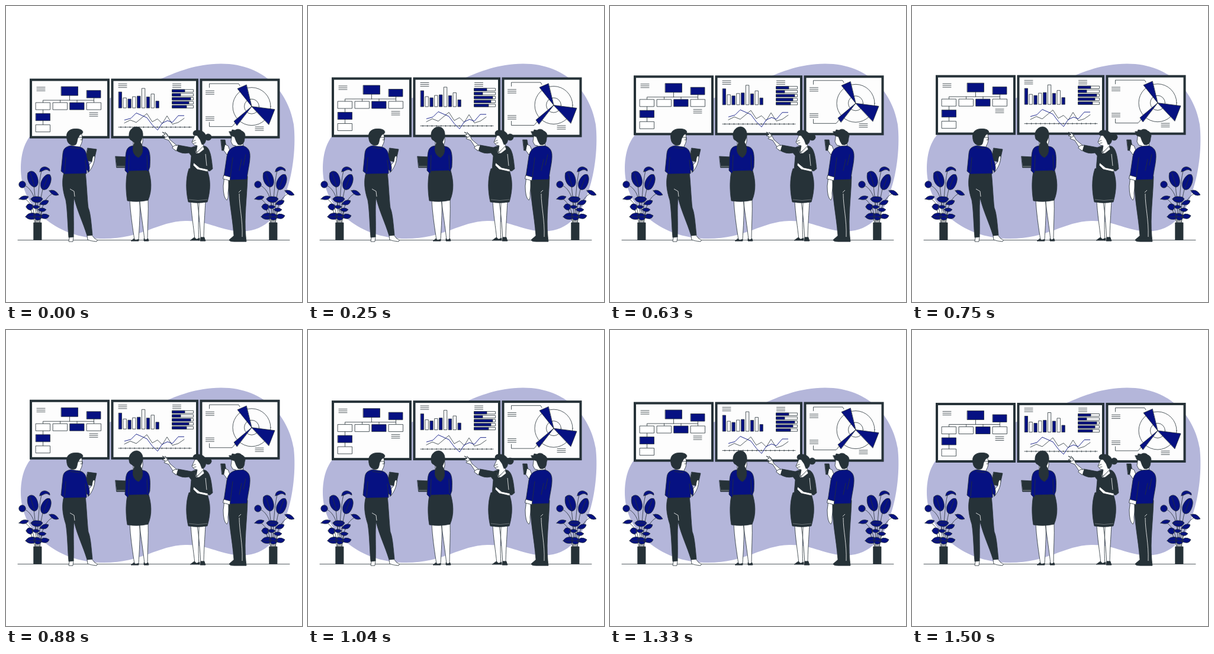
Animation of 500 by 500 pixels, one loop 1.54 s. Source, as an HTML page:

```html
<!DOCTYPE html>
<html lang="en">
<head>
<meta charset="utf-8">
<title>Team at the dashboards</title>
<style>
  html, body { margin: 0; width: 100%; height: 100%; overflow: hidden; background: #fff; }
  svg { display: block; width: 100%; height: 100%; }
  .d { fill: #263238; }
  .b { fill: #061182; }
  .w { fill: #fff; }
  .n { fill: none; }
  .d, .b, .w, .n { stroke: #263238; stroke-width: .8; stroke-linejoin: round; stroke-linecap: round; }
  .light { fill: none; stroke: #fff; stroke-width: .8; }
  .blue { fill: none; stroke: #061182; stroke-width: .9; }
</style>
</head>
<body>
<svg viewBox="0 0 500 500">
  <path fill="#b4b6da" d="M45 215C24 235 22 275 28 300C40 352 95 393 165 393C230 393 256 364 303 363C342 362 364 381 400 380.500C440 380 463 350 474 312C485 280 490 235 486 200C478 150 440 97.500 363 97.500C320 98 290 111 264 122C220 140 100 180 45 215Z"/>
  <g id="screens"></g>

  <path class="n" d="M20 395.400H479"/>
  <g id="plant">
    <path class="n" d="M51 366C51 340 49 320 45 285M53 366C53 335 55 300 60 278M55 366C56 335 60 315 67 290M50 366C48 350 46 334 31 325M57 366C58 345 65 321 81 316M49 366L41 341M57 366L61 345M51 340C49 322 42 306 29 302"/>
    <path class="b" d="M57 280C57 272 65 270 70 273Q75 275 74 279Q69 275 65 277Q60 280 57 280Z"/>
    <path class="b" d="M37 282C42 276 50 279 53 289C56 298 54 305 48 306C39 304 34 291 37 282Z"/>
    <path class="b" d="M74 285C79 290 75 304 69 309C62 313 57 308 59 298C62 289 69 282 74 285Z"/>
    <circle class="b" cx="27.500" cy="301.500" r="5.700"/>
    <path class="b" d="M22 326Q28 318 38 322Q35 330 22 326ZM73 312Q82 308 89 319Q80 323 73 312ZM42 326Q45 321 53 322Q60 322 62 326Q58 333 51 332Q44 331 42 326ZM57 335Q63 325 72 329Q70 339 57 335ZM34 339Q37 331 45 336Q47 342 42 345Q35 344 34 339ZM54 344Q61 338 68 344Q62 351 54 344ZM33 356Q38 348 48 350Q52 356 47 360Q38 362 33 356ZM57 357Q62 347 73 354Q70 363 57 357ZM47 352Q53 347 60 354Q61 361 53 362Q46 360 47 352ZM44 339Q50 334 57 339Q51 346 44 339Z"/>
    <path class="n" d="M41 282L48 304M71 288L63 308M44 326H60M36 356H60"/>
    <path class="d" d="M47 366H60V395H47Z"/>
  </g>
  <use href="#plant" x="398"/>

  <!-- man with tablet -->
  <g>
    <path class="w" d="M107 390L106 398H113L114 389ZM137 388L138 395Q143 397 153 398Q156 395 150 393L145 387Z"/>
    <path class="d" d="M98 281C94 295 95 310 101 328C104 345 104 370 106 391L114 390C115 365 113 340 115 324C121 348 130 365 137 388L146 387C144 368 143 350 139 341C137 325 136 295 134 281Z"/>
    <path class="light" d="M108 309L115 313L116 322"/>
    <path class="w" d="M111 239L113 228L119 214H127C130 222 129 231 126 235L124 240Z"/>
    <path class="d" d="M103 224C100 212 109 207 118 207.500C126 207 132 211 129 215C127 217 124 217 123 221C120 223 121 230 118 234Q115 236 111 235C105 233 103 228 103 224Z"/>
    <path class="n" d="M121 222H129V226H126"/>
    <path class="d" d="M138 240L153 242L148 264L134 260Z"/>
    <path class="w" d="M139 281C145 275 150 264 150 254Q147 252 146 257L145 263L138 271Z"/>
    <path class="b" d="M109 236C100 238 97 241 96 249L93 279L99 284L136 283L136 276L140 280C143 272 139 264 137 256C135 244 132 240 124 238Z"/>
    <path class="n" d="M101 256L99 281M134 260L136 277M109 239L124 241"/>
  </g>

  <!-- woman with laptop -->
  <g>
    <path class="w" d="M209 326C210 350 214 375 217 395H224C225 375 227 350 226 328ZM225 326C228 350 232 375 234 395H239C239 370 241 348 240 326Z"/>
    <path class="d" d="M216 393L211 397H224V394L219 396ZM233 393V397H241L240 393L236 395Z"/>
    <path class="d" d="M185 254L204 255V273H187Z"/>
    <path class="light" stroke-opacity=".6" d="M187 271H202"/>
    <path class="d" d="M206 276C202 290 202 312 205 329Q223 332 240 328C247 312 246 293 240 275Z"/>
    <path class="b" d="M215 236C206 237 203 241 202 254L201 278L206 283L208 279L238 278L240 280L243 272C244 255 244 241 235 238L228 236Z"/>
    <path class="n" d="M208 252L207 279M238 252L239 276"/>
    <path class="w" d="M212 222H231V229L229 237H215V230Z"/>
    <path class="d" d="M208 219C207 210 214 204 221 204C229 205 232 212 231 221L227 230C231 236 234 249 224 256C214 252 212 241 217 231L212 227C209 226 208 223 208 219Z"/>
  </g>

  <!-- woman pointing -->
  <g>
    <path class="w" d="M312 329C313 350 317 375 319 394L326 396C324 370 326 350 326 330ZM323 330C326 350 328 375 329 395H334C334 375 336 350 337 329Z"/>
    <path class="d" d="M318 391L311 396H327V392L322 394ZM329 391L328 397H337L335 391Z"/>
    <path class="d" d="M309 275C303 292 304 314 308 331Q324 334 340 331C346 310 346 292 339 275Z"/>
    <path class="light" stroke-opacity=".4" d="M309 327Q324 330 340 327"/>
    <path class="w" d="M289 236L277 226L272 216L264 213L269 217L264 219L269 221L267 224L275 227L286 244Z"/>
    <path class="n" d="M269 213L273 220L269 222"/>
    <path class="d" d="M287 238L291 235L313 239C320 236 328 235 337 237C345 241 347 255 349 275L344 279L340 277L311 277L313 253L309 248Q297 251 286 243Z"/>
    <path class="w" d="M284 236L291 235L288 245L281 240ZM317 265L316 269L323 276L341 280V276L327 273Z"/>
    <path class="w" d="M319 219L314 230L318 235L323 236L321 248L334 238L331 219Z"/>
    <path class="w" d="M318 239L322 248L333 237L335 242L326 249L321 249Z"/>
    <path class="n" d="M315 229L320 227M317 232L321 231"/>
    <path class="light" d="M337 250L339 270"/>
    <circle class="d" cx="341.500" cy="221.500" r="5.500"/>
    <path class="d" d="M317 218C314 214 318 209 324 210C333 210 339 216 338 224C337 231 335 234 331 234L328 226L323 219Z"/>
  </g>

  <!-- man with phone -->
  <g>
    <path class="d" d="M363 226L370 226L373 244L365 244Z"/>
    <path class="w" d="M370 234L375 236L379 246L373 251L368 244Z"/>
    <path class="w" d="M369 288L367 304Q367 324 373 328Q376 325 375 316L378 288Z"/>
    <path class="d" d="M376 289C375 325 382 350 385 388L377 395Q377 398 386 398H406L405 389C402 355 407 325 408 288Z"/>
    <path class="light" d="M393 315L397 311M394 317C394 340 400 360 399 390"/>
    <path class="w" d="M382 215L380 229L383 235L388 236V240L401 239L399 219Z"/>
    <path class="d" d="M377 212L381 212L382 209L387 210C390 207 396 208 398 211C404 213 405 219 403 223C403 230 400 236 392 234L389 229L386 221L380 219Z"/>
    <path class="b" d="M388 237C378 240 375 245 373 254L368 288L377 291L379 294L407 293C408 277 413 264 412 250C411 241 406 238 400 236Z"/>
    <path class="w" d="M368 286L379 289L378 295L367 292Z"/>
    <path class="n" d="M383 256L379 289M398 259L394 278M405 251L401 269"/>
  </g>
</svg>
<script>
const screens = document.getElementById('screens');
const rect = (kind, x, y, w, h) => `<rect class="${kind}" x="${x}" y="${y}" width="${w}" height="${h}"/>`;
const path = (kind, d) => `<path class="${kind}" d="${d}"/>`;
const note = (x, y) => path('n', [0, 3, 6].map(dy => `M${x} ${y + dy}h14`).join(''));
const frame = (x, w) => `<rect x="${x}" y="125" width="${w}" height="97" fill="#fdfdfd" stroke="#263238" stroke-width="4"/>`;

const orgChart = frame(42, 131) + note(52, 137.5) + note(141, 180.5)
  + path('n', 'M107.500 151V159.500M62.500 201V159.500H148.500M91.500 163V159.500M120 163V159.500M148.500 155V163')
  + rect('b', 93.5, 136.5, 28, 15) + rect('b', 136.5, 143, 23.5, 12.5)
  + [50.5, 79.5, 108, 136.5].map((x, i) => rect(i === 2 ? 'b' : 'w', x, 163.5, 24, 12)).join('')
  + rect('b', 50.5, 182, 24, 12) + rect('w', 50.5, 201, 24, 12);

const bars = [27, 17, 15, 19, 20, 33, 18.5, 23.5, 11.5]
  .map((h, i) => rect(i % 2 || i === 5 ? 'w' : 'b', 190.5 + i * 7.85, 172.5 - h, 5, h)).join('');
const meters = [21, 14, 31, 28, 24].map((w, i) => {
  const y = 141.5 + i * 6.7;
  return rect('w', 281, y, 35.5, 4.3) + rect('b', 281, y, w, 4.3);
}).join('');
const ticks = Array.from({length: 16}, (_, i) => `M${194 + i * 7.7} 204v2`).join('');
const charts = frame(179.5, 143.5) + note(190, 132) + note(281.5, 132) + bars + meters
  + path('n', 'M190 205H313' + ticks)
  + path('n', 'M200 198L210 193L220 197L238 182L247 196L256 191L264 199L272 186L281 200L291 197L301 190')
  + path('blue', 'M200 193L211 190L220 181L238 189L247 201L256 210L264 198L273 194L281 197L291 185.500H301');

const radial = frame(329.5, 131) + note(337.5, 143.5) + note(337.5, 187.5) + note(421, 204.5)
  + path('n', 'M343.500 138V131.500H393L395 135M343.500 197V204H382L387 198')
  + '<circle class="n" cx="415" cy="170" r="32"/><circle class="n" cx="415" cy="170" r="12.5"/>'
  + path('b', 'M415 170L391 140L406 133.500ZM415 170L454 175L444 200.500ZM415 170L385 195L390 202Z');

screens.innerHTML = orgChart + charts + radial;

// The screens rise and sink at constant speed.
const LOOP = 1540, LEAD = 40, LIFT = 6.5;
function draw(now) {
  const phase = (now + LEAD) % LOOP / LOOP;
  const lift = LIFT * (1 - Math.abs(2 * phase - 1));
  screens.setAttribute('transform', `translate(0 ${-lift})`);
  requestAnimationFrame(draw);
}
draw(performance.now());
</script>
</body>
</html>
```
